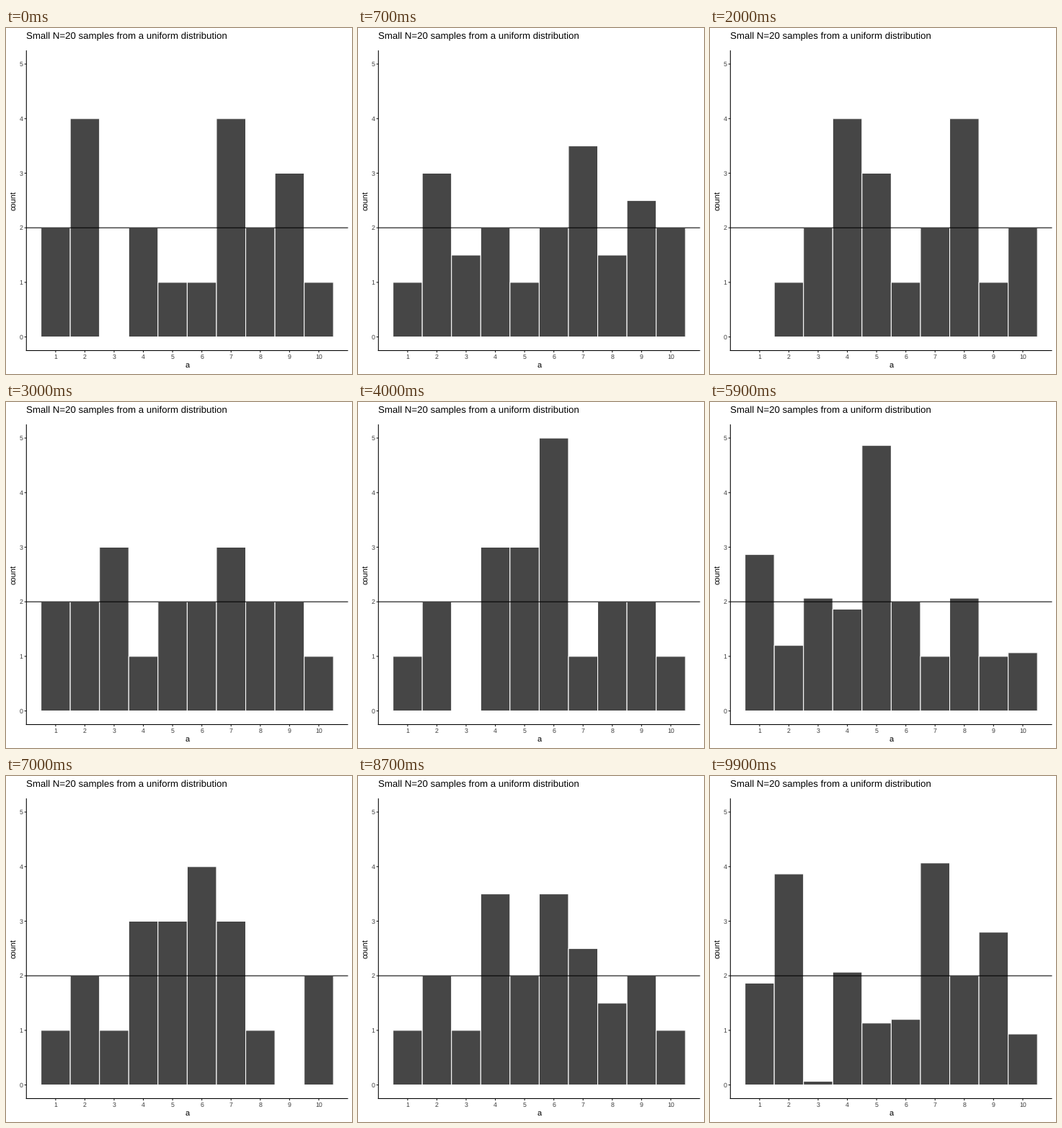
Recreate the animation shown at these times as a matplotlib script. Size 480 by 480 pixels, loop 10 s.

```python
import math

import matplotlib.pyplot as plt
from matplotlib.animation import FuncAnimation
from matplotlib.patches import Rectangle

plt.rcParams.update({
    "font.family": "Liberation Sans",
    "text.hinting": "none",
    "toolbar": "None",
})

SIZE, DPI = 480, 72
LEFT, RIGHT, TOP, BOTTOM = 28.3, 474.5, 31.1, 447.5
LINE, TICK = 1.07, 2.74
BAR, LABEL, TICK_COLOR = "#464646", "#3c3c3c", "#222222"

FPS, STEP, HOLD = 10, 10, 4      # frames per second, per sample, at rest
TWEEN = STEP - HOLD

# Counts of the values 1 to 10 in each sample of 20
SAMPLES = [[int(c) for c in row] for row in (
    "2402114231", "0232133123", "0124312412", "2231223221", "1203351221",
    "1430321312", "3122521211", "1213343102", "2214130142", "0213345200",
)]


def px(x):
    return LEFT + x * (RIGHT - LEFT) / 11


def py(y):
    return BOTTOM - (y + 0.25) * (BOTTOM - TOP) / 5.5


fig = plt.figure(figsize=(SIZE / DPI, SIZE / DPI), dpi=DPI, facecolor="white")
ax = fig.add_axes([0, 0, 1, 1])
ax.set_xlim(0, SIZE)
ax.set_ylim(SIZE, 0)
ax.axis("off")


def line(x0, y0, x1, y1, color="black", z=3):
    ax.plot([x0, x1], [y0, y1], color=color, lw=LINE, zorder=z,
            solid_capstyle="butt", snap=False)


def text(x, y, s, size, color="black", ha="center", **kw):
    ax.text(x, y, s, fontsize=size, color=color, ha=ha, va="baseline", **kw)


bars = []
for value in range(1, 11):
    bar = Rectangle((px(value - 0.5), py(0)), px(1) - px(0), 0, fc=BAR,
                    ec="white", lw=LINE, joinstyle="miter", snap=False, zorder=1)
    bars.append(ax.add_patch(bar))
    line(px(value), BOTTOM, px(value), BOTTOM + TICK, TICK_COLOR)
    text(px(value), 458.8, str(value), 8.8, LABEL)

for count in range(6):
    line(LEFT - TICK, py(count), LEFT, py(count), TICK_COLOR)
    text(LEFT - TICK - 2.2, py(count) + 3.2, str(count), 8.8, LABEL, ha="right")

line(LEFT, py(2), RIGHT, py(2), z=2)
line(LEFT, TOP, LEFT, BOTTOM + LINE / 2)
line(LEFT - LINE / 2, BOTTOM, RIGHT, BOTTOM)

text(LEFT, 15, "Small N=20 samples from a uniform distribution", 13.2, ha="left")
text((LEFT + RIGHT) / 2, 472.2, "a", 11)
text(13.4, (TOP + BOTTOM) / 2, "count", 11, rotation=90, rotation_mode="anchor")


def update(frame):
    index, phase = divmod(frame, STEP)
    start = SAMPLES[index]
    end = SAMPLES[(index + 1) % len(SAMPLES)]
    t = max(0, phase - HOLD) / TWEEN
    ease = (1 - math.cos(math.pi * t)) / 2
    for bar, a, b in zip(bars, start, end):
        bar.set_height(py(a + (b - a) * ease) - py(0))
    return bars


anim = FuncAnimation(fig, update, frames=STEP * len(SAMPLES),
                     interval=1000 / FPS, repeat=True, repeat_delay=0)
plt.show()
```
